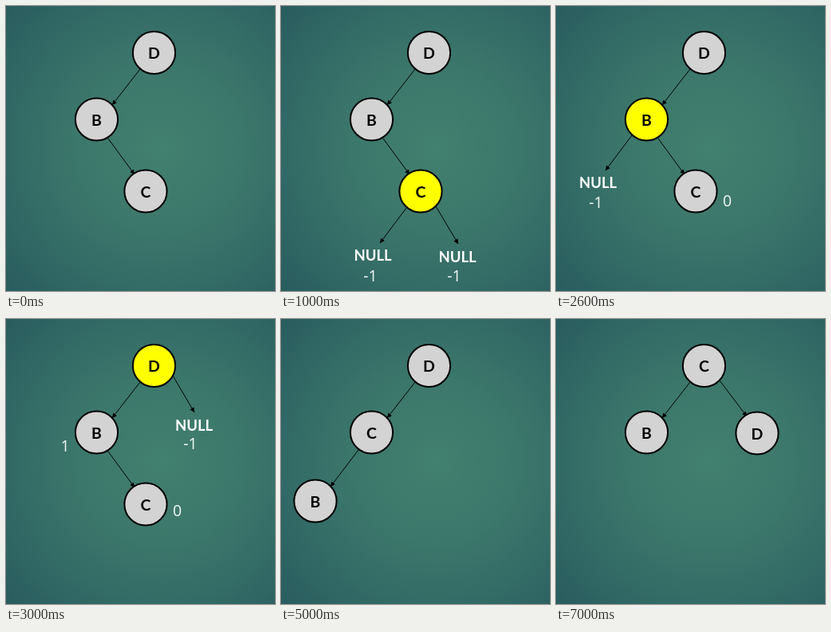
An HTML page for the animation above (8 s loop, 337 by 357 pixels).

```html
<!DOCTYPE html>
<html>
<head>
<meta charset="utf-8">
<style>
  html, body { margin: 0; width: 100%; height: 100%; overflow: hidden; }
  svg { display: block; width: 337px; height: 357px; }
  text { font-family: Lato, sans-serif; text-anchor: middle; }
  .key { font-size: 19.5px; font-weight: 700; }
  .null { font-size: 18.5px; font-weight: 700; fill: #fff; }
  .height { font-family: "Open Sans", sans-serif; font-size: 19.5px; fill: #f2f7f5; }
  circle { stroke: #000; stroke-width: 2; }
  line { stroke: #000; stroke-width: 1; }
</style>
</head>
<body>
<svg viewBox="0 0 337 357">
  <defs>
    <radialGradient id="glow" gradientUnits="userSpaceOnUse" cx="194" cy="178" r="262">
      <stop offset="0" stop-color="#42806f"/>
      <stop offset=".4" stop-color="#3c776b"/>
      <stop offset=".75" stop-color="#316865"/>
      <stop offset="1" stop-color="#295c5e"/>
    </radialGradient>
    <marker id="head" markerUnits="userSpaceOnUse" markerWidth="7" markerHeight="7" refX="6" refY="3" orient="auto">
      <path d="M0 0L6 3L0 6Z"/>
    </marker>
  </defs>
  <rect width="337" height="357" fill="url(#glow)"/>
  <g id="scene"></g>
</svg>
<script>
const node = (key, x, y, active) =>
  `<circle cx="${x}" cy="${y}" r="26.6" fill="${active ? '#ff0' : '#d3d3d3'}"/>
   <text class="key" x="${x}" y="${y + 7.7}">${key}</text>`;
const arrow = (x1, y1, x2, y2) =>
  `<line x1="${x1}" y1="${y1}" x2="${x2}" y2="${y2}" marker-end="url(#head)"/>`;
const label = (kind, text, x, y) => `<text class="${kind}" x="${x}" y="${y}">${text}</text>`;
const height = (value, x, y) => label('height', value, x, y);
const empty = (x, y, hx, hy) => label('null', 'NULL', x, y) + height('-1', hx, hy);

const rootNode = (key, active) => node(key, 185.5, 58.5, active);
const leftNode = (key, active) => node(key, 113.5, 142, active);
const rootToLeft = arrow(168, 79, 133, 124);

// Unbalanced tree with one node optionally highlighted
const zigzag = active =>
  rootToLeft + arrow(128, 166, 161, 211) +
  rootNode('D', active === 'D') + leftNode('B', active === 'B') + node('C', 175, 232, active === 'C');

const steps = [
  [0, zigzag()],
  [1000, zigzag('C') + arrow(157, 253, 124, 297) + arrow(194, 251, 222, 298) +
    empty(115, 319, 112, 345) + empty(221, 321, 217, 345)],
  [2000, zigzag('B') + arrow(95, 162, 62, 206) + empty(52.5, 228, 50, 253) + height('0', 214.5, 251)],
  [3000, zigzag('D') + arrow(209, 71, 236, 117) + empty(235.5, 140, 231, 163) +
    height('1', 74, 166) + height('0', 214.5, 247)],
  [4000, zigzag('B')],
  [5000, rootToLeft + arrow(97, 164, 62, 210) + rootNode('D') + leftNode('C') + node('B', 43, 228)],
  [7000, rootToLeft + arrow(205, 77, 239, 122) + rootNode('C') + leftNode('B') + node('D', 252, 143)]
];

const scene = document.getElementById('scene');
let shown;
function draw() {
  const time = performance.now() % 8000;
  const step = steps.findLast(([start]) => start <= time);
  if (step !== shown) scene.innerHTML = (shown = step)[1];
  requestAnimationFrame(draw);
}
draw();
</script>
</body>
</html>
```
